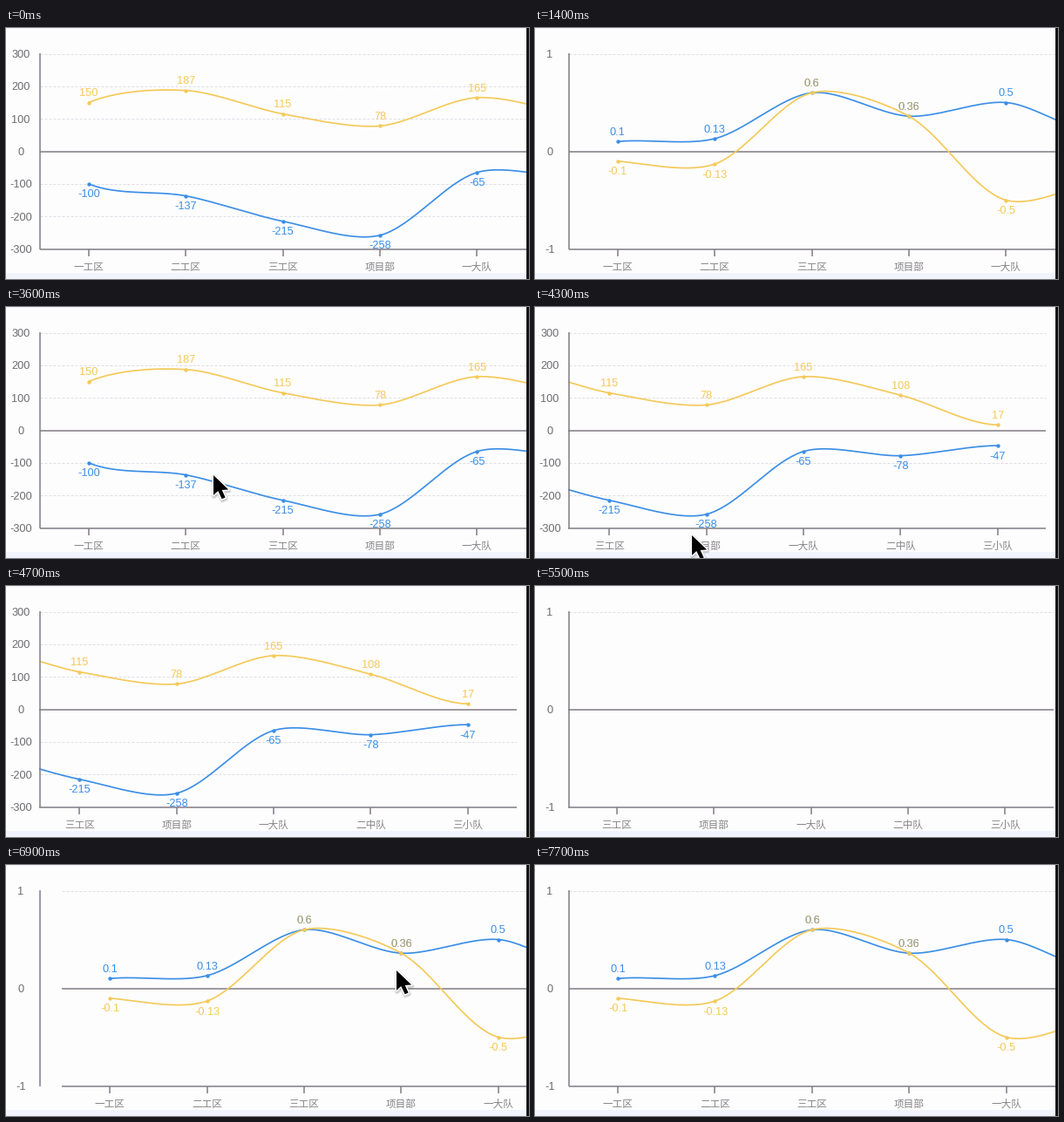
A matplotlib script that plays this animation: 600x288 px, repeating every 7.8 s.

```python
import numpy as np
import matplotlib.pyplot as plt
from matplotlib.animation import FuncAnimation
from matplotlib.patches import Polygon, Rectangle

W, H, DPI = 600, 288, 100
STEP, LOOP = 100, 7800
PX = 72 / DPI

PAPER, STRIP, EDGE = "#fefdfe", "#f1f4fc", "#141414"
AXIS, GRID, INK, CAT = "#7f7a83", "#dddde4", "#6c6a6e", "#858387"
BLUE, GOLD, TAN = "#3a8ee6", "#f4c958", "#cbae69"

LEFT, RIGHT = 38.5, 596.6
TOP, ZERO, BOTTOM = 29.5, 141.5, 253.5
PITCH, SMOOTH = 111.4, 0.3
CATS = ["一工区", "二工区", "三工区", "项目部", "一大队", "二中队", "三小队"]
CONTENT = PITCH * len(CATS)
SLOTS = PITCH * (np.arange(len(CATS)) + 0.5)

WIDE = dict(top=300, step=100,
            blue=[-100, -137, -215, -258, -65, -78, -47],
            gold=[150, 187, 115, 78, 165, 108, 17])
UNIT = dict(top=1, step=1,
            blue=[0.1, 0.13, 0.6, 0.36, 0.5, 0.2, 0.8],
            gold=[-0.1, -0.13, 0.6, 0.36, -0.5, -0.2, 0.8])

VIEWS = [(-LOOP, WIDE), (800, UNIT), (2400, WIDE), (5500, UNIT)]
UNROLL, DELAY = 750, 60

FAR = -223   # scroll position that shows the last category
# start, release, from, to, overshoot, spring-back time
DRAGS = [(3800, 4400, 0, FAR, -28, 300), (6300, 6900, FAR, 0, 24.4, 180)]
# time, x, y
POINTER = [[(3600, 238, 193), (3850, 430, 150), (4300, 180, 262)],
           [(6100, 160, 190), (6300, 220, 128), (6900, 448, 121),
            (7100, 530, 200)]]
ARROW = 0.88 * np.array([(0, 0), (0, 26), (6, 20.5), (11, 31), (15.5, 29),
                         (11, 19.3), (19.5, 18.7)])

fig = plt.figure(figsize=(W / DPI, H / DPI), dpi=DPI, facecolor=PAPER)
ax = fig.add_axes([0, 0, 1, 1])


def ease(t):
    t = np.clip(t, 0, 1)
    return t * t * (3 - 2 * t)


def scroll_at(ms):
    pos = 0
    for start, release, a, b, over, tau in DRAGS:
        if ms >= release:
            pos = b + over * np.exp((release - ms) / tau)
        elif ms >= start:
            pos = a + (b + over - a) * ease((ms - start) / (release - start))
    return pos


def pointer_at(ms):
    for path in POINTER:
        for (t0, *a), (t1, *b) in zip(path, path[1:]):
            if t0 <= ms <= t1:
                k = ease((ms - t0) / (t1 - t0))
                return np.array(a) * (1 - k) + np.array(b) * k
    return None


def y_of(value, chart):
    return ZERO - np.asarray(value) / chart["top"] * (ZERO - TOP)


def smooth_curve(pts, n=40):
    """Cubic curve through pts, tangents shared out by segment length."""
    seg = np.hypot(*np.diff(pts, axis=0).T)
    before, after = pts.copy(), pts.copy()
    for i in range(1, len(pts) - 1):
        v = (pts[i + 1] - pts[i - 1]) * SMOOTH
        share = seg[i] / (seg[i] + seg[i - 1])
        before[i] -= v * (1 - share)
        after[i] += v * share
    # the outer handles sit level with the right end of their segment
    after[0] = pts[0, 0] + SMOOTH * PITCH, pts[1, 1]
    before[-1, 0] -= SMOOTH * PITCH
    t = np.linspace(0, 1, n)[:, None]
    return np.vstack([
        (1 - t) ** 3 * pts[i] + 3 * (1 - t) ** 2 * t * after[i]
        + 3 * (1 - t) * t ** 2 * before[i + 1] + t ** 3 * pts[i + 1]
        for i in range(len(pts) - 1)])


def line(x, y, color, width=1.5, z=1, **kw):
    ax.plot(x, y, color=color, lw=width * PX, zorder=z,
            solid_capstyle="butt", dash_capstyle="butt", **kw)


def text(x, y, s, color, size, z=5, font="Liberation Sans"):
    ax.text(x, y + 0.36 * size, s, color=color, fontsize=size * PX,
            family=font, ha="center", va="baseline", zorder=z)


def box(x, y, w, h, color, z):
    ax.add_patch(Rectangle((x, y), w, h, fc=color, ec="none", zorder=z))


def draw_frame(chart, x0):
    top, step = chart["top"], chart["step"]
    ends = [x0, x0 + CONTENT]
    for v in range(-top, top + 1, step):
        y = y_of(v, chart)
        if v in (0, -top):
            line(ends, [y, y], AXIS)
        else:
            line(ends, [y, y], GRID, 1, linestyle=(0, (3, 2)))
        text(17, y, str(v), INK, 12.8, 12)
    for x, name in zip(x0 + SLOTS, CATS):
        if -60 < x < W + 60:
            line([x, x], [BOTTOM, BOTTOM + 8], AXIS)
            text(x, 274, name, CAT, 11.6, font="Noto Sans CJK JP")


def draw_series(chart, x0, front):
    for key, color, z in (("blue", BLUE, 3), ("gold", GOLD, 4)):
        ys = y_of(chart[key], chart)
        cx, cy = smooth_curve(np.column_stack([SLOTS, ys])).T
        edge = min(front, cx[-1])
        if edge <= cx[0]:
            continue
        seen = cx <= edge
        line(x0 + np.append(cx[seen], edge),
             np.append(cy[seen], np.interp(edge, cx, cy)), color, 1.7, z)
        for x, y, v, other in zip(SLOTS, ys, chart[key], chart["blue"]):
            if x > front or not -40 < x0 + x < W + 40:
                continue
            ax.plot(x0 + x, y, "o", color=color, ms=4.4 * PX, mew=0, zorder=z)
            shared = key == "gold" and v == other
            text(x0 + x, y + (-12 if v > 0 else 11), str(v),
                 TAN if shared else color, 12.8, z + 5)


def draw_pointer(tip):
    shape = ARROW + tip
    for width, alpha in ((6, 0.06), (4, 0.12)):
        ax.add_patch(Polygon(shape + (0.6, 1.6), fc="black", ec="black",
                             lw=width * PX, alpha=alpha, joinstyle="round",
                             zorder=13))
    ax.add_patch(Polygon(shape, fc="white", ec="white", lw=3 * PX,
                         joinstyle="round", zorder=14))
    ax.add_patch(Polygon(shape, fc="black", ec="none", zorder=15))


def update(i):
    ms = i * STEP
    ax.clear()
    ax.set_xlim(0, W)
    ax.set_ylim(H, 0)
    ax.axis("off")

    since, chart = [v for v in VIEWS if v[0] <= ms][-1]
    x0 = LEFT + 0.6 + scroll_at(ms)

    box(0, 0, W, 1, STRIP, 0)
    box(0, 281, W, H - 281, STRIP, 0)
    draw_frame(chart, x0)
    draw_series(chart, x0, CONTENT * (ms - since - DELAY) / UNROLL)

    # hides whatever has scrolled past the value axis
    box(0, 1, LEFT - 0.5, 280, PAPER, 10)
    line([LEFT, LEFT], [TOP - 0.5, BOTTOM], AXIS, 1.5, 11)
    tip = pointer_at(ms)
    if tip is not None:
        draw_pointer(tip)
    box(RIGHT, 0, W - RIGHT, H, EDGE, 20)
    return []


anim = FuncAnimation(fig, update, frames=LOOP // STEP, interval=STEP,
                     init_func=lambda: [], repeat=True, repeat_delay=0)
plt.show()
```
